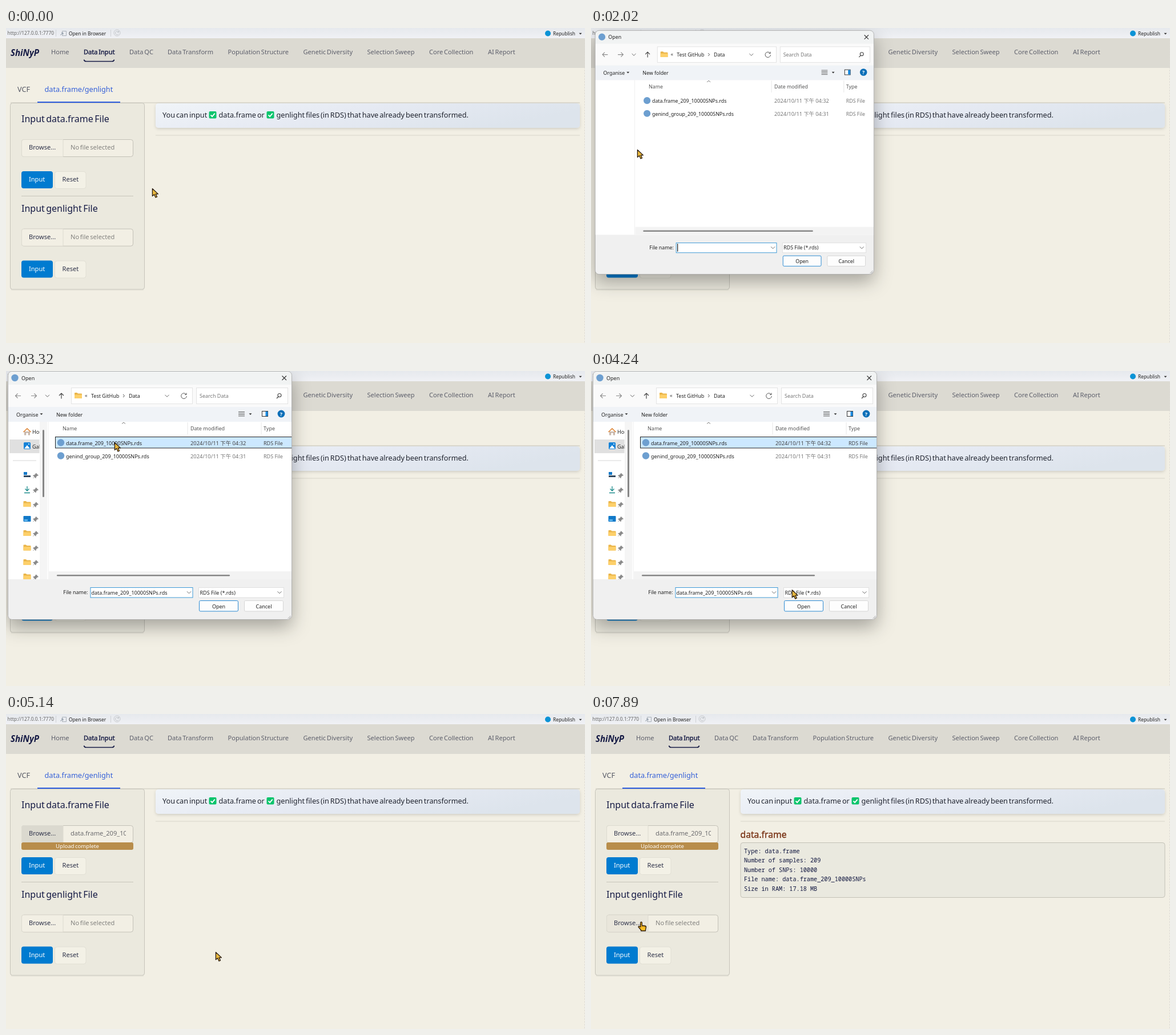
An HTML page that plays this animation: 1014 by 552 pixels, repeating every 8000 ms.

```html
<!DOCTYPE html>
<html lang="en">
<head>
<meta charset="utf-8">
<title>Data input</title>
<style>
  html, body { margin: 0; width: 100%; height: 100%; overflow: hidden; background: #f2efe4; }
  svg { display: block; width: 1014px; height: 552px; }
  text { font-family: "Noto Sans", "Noto Sans CJK TC", "Noto Sans CJK JP", sans-serif; white-space: pre; }
  #page text { word-spacing: -.11em; }
  #page .ui { word-spacing: 0; }
  #page .mono { font-family: "Noto Sans Mono", "DejaVu Sans Mono", monospace; word-spacing: 0; }
</style>
</head>
<body>
<svg id="stage" viewBox="0 0 1014 552"></svg>
<script>
const LOOP = 8000, STEP = 101.5, START = 360;
const NAVY = '#161b45', INK = '#2c3048', PAPER = '#f2efe4';

const text = (x, y, s, size, fill = '#222', more = '') =>
  `<text x="${x}" y="${y}" font-size="${size}" fill="${fill}" ${more}>${s}</text>`;
const rect = (x, y, w, h, fill, more = '') =>
  `<rect x="${x}" y="${y}" width="${w}" height="${h}" fill="${fill}" ${more}/>`;
const line = (d, stroke = '#444', w = 1, more = '') =>
  `<path d="${d}" fill="none" stroke="${stroke}" stroke-width="${w}" ${more}/>`;
const shape = (d, fill, more = '') => `<path d="${d}" fill="${fill}" ${more}/>`;
const dot = (x, y, r, fill) => `<circle cx="${x}" cy="${y}" r="${r}" fill="${fill}"/>`;
const use = (id, x, y) => `<use href="#${id}" x="${x}" y="${y}"/>`;
const chevron = (x, y, c = '#666') => line(`M${x - 3.5} ${y - 1.7}l3.5 3.5 3.5-3.5`, c);
const caret = (x, y) => shape(`M${x - 2.5} ${y - 1.2}h5l-2.5 2.6z`, '#333');
const bold = c => `stroke="${c}" stroke-width=".4"`;

const defs = `<defs>
  <linearGradient id="info" x2="1" y2=".3"><stop stop-color="#f0f4f8"/><stop offset=".5" stop-color="#e6eaf3"/><stop offset="1" stop-color="#dde4ec"/></linearGradient>
  <linearGradient id="bar" x2="0" y2="1"><stop stop-color="#e6e9ed"/><stop offset="1" stop-color="#f0f1f5"/></linearGradient>
  <filter id="soft" x="-20%" y="-30%" width="140%" height="180%"><feDropShadow dx="0" dy="2" stdDeviation="2.5" flood-opacity=".14"/></filter>
  <filter id="deep" x="-20%" y="-20%" width="140%" height="150%"><feDropShadow dx="0" dy="13" stdDeviation="16" flood-opacity=".32"/></filter>
  <clipPath id="fileClip"><rect x="101" y="196" width="109" height="30"/></clipPath>
  <clipPath id="sideClip"><rect x="4" y="89" width="54.5" height="276"/></clipPath>
  <clipPath id="frame"><rect x="3.5" y=".5" width="497" height="435" rx="7"/></clipPath>
  <g id="folder"><path d="M0 1q0-1 1-1h3.5l1.5 1.5H12q1 0 1 1V10H0z" fill="#eab54a"/><path d="M0 3.5h13V9q0 1-1 1H1q-1 0-1-1z" fill="#fdd06a"/></g>
  <g id="pin"><path d="M5-4l4 4-2 .5-2 2.2-.4 2L0 0l2-.4L4.5-2.5zM2.3 2.6L0 5" fill="#8a8a8a" stroke="#8a8a8a" stroke-width=".8"/></g>
  <g id="tick"><rect width="13" height="12.5" rx="2" fill="#0cc46c"/><path d="M3 6.5l2.6 2.6L10.2 3.6" fill="none" stroke="#fff" stroke-width="1.8"/></g>
</defs>`;

const nav = [[79, 'Home'], [216, 'Data QC'], [283, 'Data Transform'], [388.5, 'Population Structure'],
  [520.5, 'Genetic Diversity'], [632.5, 'Selection Sweep'], [741, 'Core Collection'], [844, 'AI Report']];

const fileForm = (id, kind, dy) => `<g transform="translate(0 ${dy})">
  ${text(27, 165, `Input ${kind} File`, 16, NAVY)}
  ${rect(27.5, 195.5, 195, 30, PAPER, 'rx="4" stroke="#c3c1b7"')}
  <path id="browse${id}" d="M100 195.5H31q-3.5 0-3.5 3.5v23q0 3.5 3.5 3.5h69z" fill="${PAPER}" stroke="#dddbd0"/>
  ${text(40, 213, 'Browse...', 11.1, INK)}
  <g clip-path="url(#fileClip)">${text(113, 213, 'No file selected', 11.1, '#83827f', `id="file${id}"`)}</g>
  ${rect(27, 251, 55, 30, '#007bd0', `rx="4" id="input${id}"`)}
  ${text(40, 269, 'Input', 11.1, '#fff')}
  ${rect(85.5, 251.5, 54.5, 30, '#f3f1e6', 'rx="4" stroke="#e1dfd4"')}
  ${text(98.5, 269, 'Reset', 11.1, INK)}
</g>`;

const results = ['Type: data.frame', 'Number of samples: 209', 'Number of SNPs: 10000',
  'File name: data.frame_209_10000SNPs', 'Size in RAM: 17.18 MB'];

const page = `<g id="page">
  ${rect(0, 0, 1014, 552, PAPER)}${rect(0, 0, 1014, 18, 'url(#bar)')}${rect(0, 18, 1014, 52, '#dcdad2')}
  ${text(2.5, 12, 'http://127.0.0.1:7770', 8.35, '#666', 'class="ui"')}
  ${line('M87.5 3v12M183.5 3v12', '#cfd2d6')}
  ${line('M98.5 5.5h7v8h-7z', '#a9b0b8')}${line('M95 12.5l5-4m-3 0h3v3', '#8d99a6')}
  ${text(110, 13, 'Open in Browser', 8.3, '#222', 'class="ui"')}
  <circle cx="194.5" cy="8.5" r="5.5" fill="none" stroke="#c6c9cc"/>${line('M197 7a3 3 0 1 0 .3 3M197.5 5v2.5H195', '#c0c4c8')}
  ${dot(949, 9.5, 5, '#0b93d6')}
  ${text(958, 13, 'Republish', 8.4, '#222', 'class="ui"')}${caret(1006, 10)}
  ${text(8, 49, 'ShiNyP', 15.1, NAVY, 'font-weight="700" font-style="italic"')}
  ${nav.map(([x, s]) => text(x, 46, s, 11.1, '#5d5f6b')).join('')}
  ${text(136, 46, 'Data Input', 11.1, NAVY, bold(NAVY))}
  ${line('M136.5 55.5q.5 3 4 3h45q3.5 0 4-3', NAVY, 1.7)}
  ${text(20, 112, 'VCF', 12.7, '#555864')}
  ${text(67.5, 112, 'data.frame/genlight', 12.7, '#3560d8')}
  ${line('M8 131h997', '#c9c7bc')}
  ${rect(7.5, 131.5, 235, 326.5, '#ebe9de', 'rx="4" stroke="#c6c4ba"')}
  ${line('M9 459h232', '#d9d7cc')}
  ${rect(55, 129, 145, 2, '#2f5ee0')}
  ${fileForm(1, 'data.frame', 0)}
  <g id="done">${rect(27, 225, 196, 13, '#b88d4b', 'rx="3"')}${text(125, 234.5, 'Upload complete', 9.6, '#fff', 'text-anchor="middle"')}</g>
  ${line('M27 294.5h196', '#c8c6bb')}
  ${fileForm(2, 'genlight', 156.6)}
  ${rect(262, 132, 743, 43, 'url(#info)', 'rx="5" filter="url(#soft)"')}
  ${text(274, 156.6, 'You can input', 12.7, '#20242f')}${use('tick', 355.5, 146)}
  ${text(372.5, 156.6, 'data.frame or', 12.7, '#20242f')}${use('tick', 456.5, 146)}
  ${text(473.5, 156.6, 'genlight files (in RDS) that have already been transformed.', 12.7, '#20242f')}
  ${line('M262 188h743', '#d8d6cb')}
  <g id="result">
    ${text(261.5, 217, 'data.frame', 15.7, '#7a3517', bold('#7a3517'))}
    ${rect(262, 225.5, 743, 96, '#eae9df', 'rx="4" stroke="#c3c1b7"')}
    ${results.map((s, i) => text(268, 243.5 + i * 16.65, s, 10.18, '#10163f', 'class="mono"')).join('')}
  </g>
</g>`;

const fileRow = (y, name, time, id) => dot(96, y - 4, 6.2, '#6d9fd0') +
  text(105, y, name, 9, '#222') + text(323, y, `2024/10/11 下午 ${time}`, 9.4, '#777', `id="date${id}"`) +
  text(451, y, 'RDS File', 9, '#777', `id="type${id}"`);

const sidebar = `<g id="side">
  ${rect(59, 89, 13, 276, '#f5f5f5')}${rect(64, 103, 3, 118, '#878787', 'rx="1.5"')}
  <g clip-path="url(#sideClip)">
    ${rect(6, 120, 60, 24, '#e0e0e0')}
    ${shape('M32 106h10v6.5h-3.3v-4h-3.4v4H32z', '#c9b8ac')}${line('M30.5 107l6.5-6 6.5 6', '#e08a3c', 1.7)}
    ${text(46, 110, 'Home', 9)}
    ${rect(31, 125, 12, 12, '#1683d8', 'rx="1.5"')}${shape('M32 136l5-6 5 6z', '#fff')}${dot(40, 128, 1, '#fff')}
    ${text(46, 135.5, 'Gallery', 9)}
    ${line('M12 157h41', '#d5d5d5')}
    ${rect(31, 177, 6, 5, '#1379c9')}${rect(31, 183, 12, 3, '#34495e')}
    ${line('M37 202v8m-3.5-3.5l3.5 3.5 3.5-3.5M32 213.5h10', '#1a8a8a', 1.3)}
    ${rect(30.5, 254, 13, 10, '#1179c8', 'rx="1"')}${rect(32, 260, 6, 3, '#5bb4ee')}
    ${[228, 279, 304.5, 330, 355].map(y => use('folder', 30.5, y)).join('')}
    ${[0, 1, 2, 3, 4, 5, 6, 7].map(i => use('pin', 47.5, 183 + i * 25.4)).join('')}
  </g>
</g>`;

const button = (x, s, id, edge) => rect(x + .5, 402.5, 68, 18.5, '#fdfdfd', `rx="2" stroke="${edge}" id="${id}"`) +
  text(x + 34.5, 415.5, s, 9, '#222', 'text-anchor="middle"');

const dialog = `<g id="dialog">
  ${rect(3.5, .5, 497, 435, '#f0f0f0', 'rx="7" filter="url(#deep)"')}
  <g clip-path="url(#frame)">
    ${rect(3, 0, 498, 24, '#f1f3f3')}${rect(3, 24, 498, 39, '#fafafa')}${rect(3, 63, 498, 26, '#f0f3f7')}
    ${rect(3, 89, 498, 276, '#fff')}${rect(75, 351, 426, 14, '#f3f3f3')}${line('M74 89v276', '#f0f0f0')}
    <g id="logo">${dot(15.5, 12, 6.2, '#6d9fd0')}</g>
    ${text(27, 15.5, 'Open', 9, '#222', 'id="title"')}${line('M483.5 8.5l7.5 7.5m0-7.5l-7.5 7.5', '#333', 1.1)}
    ${line('M26 43.5H16.5m4-4l-4 4 4 4M44 43.5h9.5m-4-4l4 4-4 4', '#8a8a8a', 1.1)}${chevron(72.5, 43.5)}
    ${line('M97 48.5v-9.5m-4 4l4-4 4 4', '#444', 1.2)}
    ${rect(114.5, 29.5, 212, 28, '#fff', 'stroke="#e3e3e3"')}${rect(333.5, 29.5, 160, 28, '#fff', 'stroke="#e3e3e3"')}
    ${use('folder', 120, 38)}${text(138, 46, '«', 9, '#444')}
    ${text(149, 46.5, 'Test GitHub', 9)}${line('M205 41l2.5 2.5-2.5 2.5', '#444')}${text(215, 46.5, 'Data', 9)}
    ${chevron(282, 43.5)}${line('M315.5 41a4.8 4.8 0 1 0 .8 3M316 38.5v3h-3', '#555')}
    ${text(339, 46.5, 'Search Data', 9, '#777')}
    <circle cx="479" cy="42.5" r="3" fill="none" stroke="#444" stroke-width="1.1"/>${line('M477 45l-3 3', '#444', 1.2)}
    ${text(18, 79.5, 'Organise', 9)}${caret(62, 75.5)}${text(88, 79.5, 'New folder', 9)}
    ${line('M407 71.5h11M407 74h11M407 76.5h11M407 79h11', '#555', .9)}${caret(428, 75.5)}
    ${rect(448.5, 70.5, 10, 9, '#fff', 'stroke="#333"')}${rect(454.5, 71, 4, 8, '#1a8ae0')}
    ${dot(482, 75, 6.4, '#0b6fb8')}${text(482, 78.5, '?', 9, '#fff', 'text-anchor="middle" font-weight="700"')}
    ${line('M203 92.5l3-2.5 3 2.5', '#777')}${line('M318 90v21M447 90v21', '#e6e6e6')}
    ${text(99, 104, 'Name', 9, '#555')}${text(323, 104, 'Date modified', 9, '#555')}${text(451, 104, 'Type', 9, '#555')}
    ${rect(86.5, 115.5, 420, 19.5, '#e5f3ff', 'id="row"')}
    ${fileRow(129.5, 'data.frame_209_10000SNPs.rds', '04:32', 1)}
    ${fileRow(152.5, 'genind_group_209_10000SNPs.rds', '04:31', 2)}
    ${sidebar}
    ${rect(89, 357, 303, 2.6, '#878787', 'rx="1.3"')}
    ${text(143.5, 391, 'File name:', 9, '#222', 'text-anchor="end"')}
    ${rect(148, 379.5, 179, 17.5, '#fff', 'id="field"')}${chevron(320.5, 388)}
    ${rect(149.5, 381.5, 134, 13.5, '#2f7fc6', 'id="mark"')}
    ${text(149.5, 391.5, 'data.frame_209_10000SNPs.rds', 9, '#222', 'id="name"')}
    ${line('M150.5 381v14', '#111', 1.2, 'id="beam"')}
    ${rect(337.5, 379.5, 149, 17.5, '#fff', 'stroke="#e0e0e0"')}${text(339.5, 391.5, 'RDS File (*.rds)', 9)}${chevron(479, 388)}
    ${button(338, 'Open', 'open', '#2b8ad2')}${button(417, 'Cancel', 'cancel', '#d6d6d6')}
    ${line('M493.5 434l5-5m-2.5 5l2.5-2.5', '#aaa')}
  </g>
  ${rect(3.5, .5, 497, 435, 'none', 'rx="7" stroke="#9a9a9a" stroke-opacity=".7"')}
</g>`;

const pen = 'stroke="#2b1c10" stroke-width="1.3" stroke-linejoin="round"';
const cursor = `<g id="cursor">
  ${shape('M.4.5V13.5L3.6 10.8 6 16 8.5 14.8 6.2 9.9H10.4z', '#e9b93f', pen + ' id="arrow"')}
  <g id="hand">${shape('M-1.3 1.3Q0-.4 1.3 1.3V6.3L6.7 7.2Q8.7 7.7 8.5 9.7L7.5 14V16H-.5V14.5L-5 9.3Q-5 7.3-3.2 7.9L-1.3 9.3z', '#fdbd22', pen)}
    ${line('M1.5 6.5v2.5M4 7v2M6.3 7.5v2', '#2b1c10', .8)}</g>
  <g id="wait">${shape('M12 4.5h7.5v2.5l-2.5 2.5 2.5 2.5v2.5H12V12l2.5-2.5L12 7z', '#e3a526', pen)}${line('M11 4h9.5M11 15h9.5', '#2b1c10', 1.7)}</g>
</g>`;

document.getElementById('stage').innerHTML = defs + page + dialog + cursor +
  line('M1013.5 18v534', '#dedcd6', 1, 'stroke-dasharray="3 2"');

const $ = id => document.getElementById(id);
const set = (id, name, value) => $(id).setAttribute(name, value);
const show = (id, on) => set(id, 'visibility', on ? 'inherit' : 'hidden');
const clamp = v => Math.max(0, Math.min(1, v));
const within = (t, a, b) => t >= a && t < b;
const mix = (a, b, k) => `rgb(${a.map((v, i) => Math.round(v + (b[i] - v) * k))})`;

// time, x, y of the pointer tip
const path = [[0, 256, 281], [270, 256, 281], [1070, 82, 206], [1260, 82, 206], [1270, 77, 204], [1470, 77, 204],
  [1475, 81, 213], [2080, 81, 213], [2590, 190, 125], [3350, 190, 125], [4450, 373, 417], [4740, 373, 417],
  [4950, 367, 417], [5430, 367, 417], [6240, 67, 279], [7080, 67, 279], [7570, 97, 349], [7690, 97, 349],
  [7865, 88, 364], [LOOP, 88, 364]];

function pointer(t) {
  const i = path.findIndex(p => p[0] > t), [a, ax, ay] = path[i - 1], [b, bx, by] = path[i];
  const u = (t - a) / (b - a), k = u * u * (3 - 2 * u);
  return [ax + (bx - ax) * k, ay + (by - ay) * k];
}

function draw(now) {
  const time = now % LOOP;
  const t = Math.max(0, START + Math.floor((time - START) / STEP) * STEP);

  const hover1 = Math.min(clamp((t - 850) / 200), clamp((5700 - t) / 200));
  const cream = [242, 239, 228], dark = [219, 217, 207];
  set('browse1', 'fill', mix(cream, dark, hover1));
  set('browse2', 'fill', mix(cream, dark, clamp((t - 7790) / 200)));
  set('input1', 'fill', mix([0, 123, 208], [0, 95, 158], Math.min(clamp((t - 6090) / 150), clamp((7350 - t) / 150))));
  const loaded = t >= 5000;
  $('file1').textContent = loaded ? 'data.frame_209_10000SNPs.rds' : 'No file selected';
  set('file1', 'fill', loaded ? '#6b6b6e' : '#83827f');
  show('done', loaded);
  show('result', t >= 6450);

  const closing = Math.max(0, t - 4670);
  const opacity = Math.min(clamp((t - 1830) / 130), clamp(1 - closing / 160));
  const scale = 1 - .018 * Math.exp((1984 - t) / 60) - closing * .00026;
  show('dialog', opacity > 0);
  set('dialog', 'opacity', opacity);
  set('dialog', 'transform', `translate(215 217) scale(${Math.max(.8, scale)}) translate(-215 -217)`);
  show('side', t > 2080);
  show('logo', !closing);
  set('title', 'x', closing ? 10 : 27);

  const chosen = t >= 2990, pressed = t >= 4420, active = chosen && !pressed;
  show('row', t > 2580);
  set('row', 'fill', pressed ? '#d9d9d9' : chosen ? '#cce8ff' : '#e5f3ff');
  set('row', 'stroke', active ? '#222' : 'none');
  for (const id of ['date1', 'type1']) set(id, 'fill', chosen ? '#444' : '#777');
  show('name', chosen);
  show('mark', pressed);
  set('name', 'fill', pressed ? '#fff' : '#222');
  set('field', 'stroke', pressed ? '#8c8c8c' : '#3e9ad6');
  show('beam', t < 2700);
  set('open', 'fill', t > 4320 ? '#c8e2f5' : '#fdfdfd');

  const [x, y] = pointer(t);
  const hand = within(t, 900, 1472) || within(t, 6130, 7200) || t > 7800;
  set('cursor', 'transform', `translate(${x.toFixed(1)} ${y.toFixed(1)})`);
  show('hand', hand);
  show('arrow', !hand);
  show('wait', within(t, 1670, 1870));
  requestAnimationFrame(draw);
}
requestAnimationFrame(draw);
</script>
</body>
</html>
```
